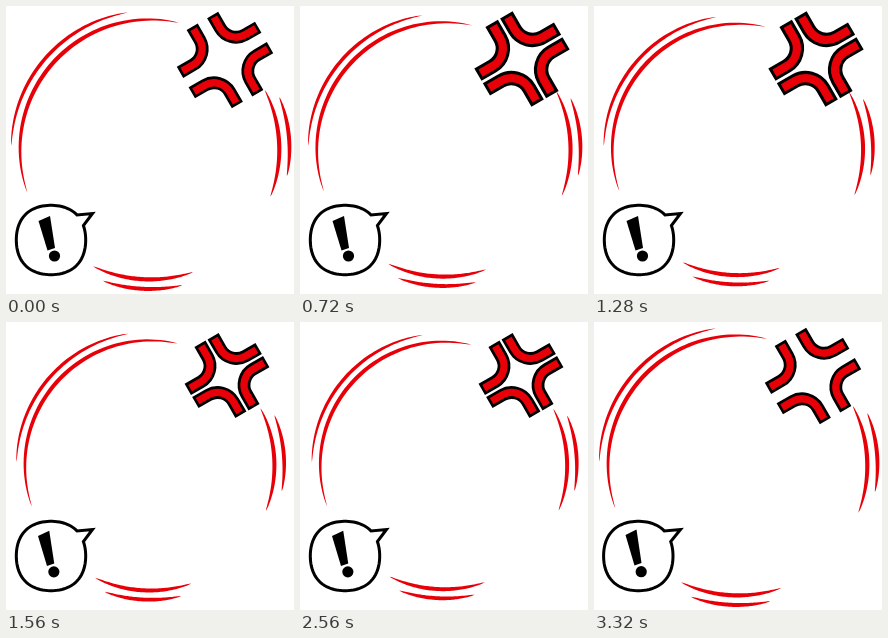
An HTML page with a canvas for the animation above (3440 ms loop, 288 px wide and 288 px high).

```html
<!DOCTYPE html>
<html lang="en">
<head>
<meta charset="utf-8">
<title>Anger ring</title>
<style>
  html, body { margin: 0; width: 100%; height: 100%; overflow: hidden; background: #fff; }
  canvas { display: block; width: 288px; height: 288px; }
</style>
</head>
<body>
<canvas id="stage" width="288" height="288"></canvas>
<script>
const ctx = document.getElementById('stage').getContext('2d');
const LOOP = 3440, STEP = 40, RED = '#e80008';
const rad = deg => deg * Math.PI / 180;

// Ring strokes: radius, thickness, start and end angle
const STROKES = [
  [130, 4.2, 160.7, 282.8],
  [138.8, 3.6, 181.5, 260.8],
  [129.3, 4.2, -27.4, 21.4],
  [139.5, 4, -22, 11],
  [129.9, 4.2, 70.7, 116],
  [139.5, 4, 76.7, 109.7]
];

function crescent([radius, width, from, to]) {
  const n = 60;
  const edge = (i, side) => {
    const p = i / n;
    const a = rad(from + (to - from) * p);
    const r = radius + side * width / 2 * Math.pow(Math.max(0, Math.sin(Math.PI * p)), 0.6);
    ctx.lineTo(r * Math.cos(a), r * Math.sin(a));
  };
  ctx.beginPath();
  for (let i = 0; i <= n; i++) edge(i, 1);
  for (let i = n; i >= 0; i--) edge(i, -1);
  ctx.fill();
}

// Slow squeeze, then a quick return to full size
function ringScale(t) {
  const depth = 0.051;
  if (t < 120) return 1;
  if (t < 2400) return 1 - depth * Math.pow((t - 120) / 2280, 0.65);
  const p = Math.min(1, (t - 2400) / 640);
  const ease = p < 0.5 ? 4 * p ** 3 : 1 - 4 * (1 - p) ** 3;
  return 1 - depth * (1 - ease);
}

function drawRing(t) {
  const s = ringScale(t);
  ctx.save();
  ctx.translate(144, 143.5);
  ctx.scale(s, s);
  ctx.fillStyle = RED;
  STROKES.forEach(crescent);
  ctx.restore();
}

// Bent band that sits between two arms of the cross
function band(tip, width, color) {
  const d = 8.5, corner = 29;
  ctx.beginPath();
  ctx.moveTo(tip, d);
  ctx.lineTo(corner, d);
  ctx.arc(corner, corner, corner - d, -Math.PI / 2, Math.PI, true);
  ctx.lineTo(d, tip);
  ctx.lineWidth = width;
  ctx.strokeStyle = color;
  ctx.stroke();
}

const OPEN = { x: 219, y: 54, size: 0.89, push: 6 };
const BIG = { x: 222, y: 53, size: 1, push: 0 };
const SMALL = { x: 221, y: 53.5, size: 0.89, push: 0 };

function markPose(t) {
  if (t < 680 || t >= 2640) return OPEN;
  if (t >= 2290) return SMALL;
  return Math.floor((t - 680) / 230) % 2 ? SMALL : BIG;
}

function drawMark(t) {
  const { x, y, size, push } = markPose(t);
  const shift = push / size * Math.SQRT1_2;
  ctx.save();
  ctx.translate(x, y);
  ctx.scale(size, size);
  ctx.rotate(rad(-30));
  for (let i = 0; i < 4; i++) {
    ctx.save();
    ctx.rotate(i * Math.PI / 2);
    ctx.translate(shift, shift);
    band(46, 14.4, '#000');
    band(43, 8.2, RED);
    ctx.restore();
  }
  ctx.restore();
}

// Hard pose changes of the bubble: time, lean
const LEANS = [[0, 1], [1400, -1], [1520, 0], [1760, -1], [2280, 0], [2800, 1], [3320, -1]];
const leanAt = t => LEANS.filter(([start]) => start <= t).pop()[1];

// Slightly squared circle with a pointed tail
function bubblePath(x, y) {
  ctx.beginPath();
  for (let deg = -24; deg <= 316; deg += 4) {
    const a = rad(deg);
    const r = 35.4 - 0.7 * Math.cos(4 * a);
    ctx.lineTo(x + r * Math.cos(a), y + r * Math.sin(a));
  }
  ctx.lineTo(86.5, 207.5);
  ctx.closePath();
}

function drawBubble(t) {
  const lean = leanAt(t);
  const k = (1 - lean) / 2;

  bubblePath(lean < 0 ? 44.3 : 45, 234);
  ctx.fillStyle = '#fff';
  ctx.fill();
  ctx.lineWidth = 3;
  ctx.lineJoin = 'miter';
  ctx.strokeStyle = '#000';
  ctx.stroke();

  ctx.fillStyle = '#000';
  ctx.beginPath();
  ctx.moveTo(32.5 - k, 215 - 2 * k);
  ctx.lineTo(44 - 1.5 * k, 210 - 2.5 * k);
  ctx.lineTo(49 - 1.5 * k, 242 - k);
  ctx.lineTo(41.5 - k, 244.5 - k);
  ctx.fill();
  ctx.beginPath();
  ctx.arc(48.5 - 1.3 * k, 250 - 0.3 * k, 5.6, 0, 2 * Math.PI);
  ctx.fill();
}

function frame(now) {
  const t = Math.floor(now % LOOP / STEP) * STEP;
  ctx.fillStyle = '#fff';
  ctx.fillRect(0, 0, 288, 288);
  drawRing(t);
  drawMark(t);
  drawBubble(t);
  requestAnimationFrame(frame);
}
frame(0);
</script>
</body>
</html>
```
